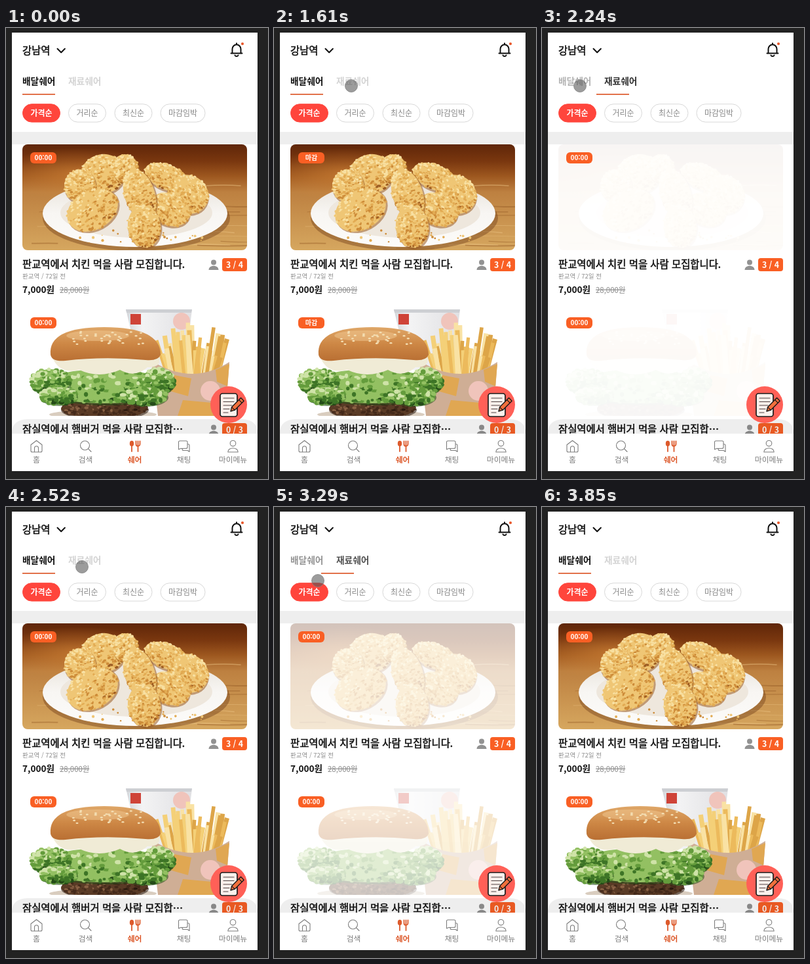
An HTML page for the animation above (4340 ms loop, 400 px wide and 686 px high).

```html
<!DOCTYPE html>
<html lang="ko">
<head>
<meta charset="utf-8">
<title>쉐어 목록</title>
<style>
  html, body { margin: 0; width: 100%; height: 100%; overflow: hidden; background: #222; }
  svg { display: block; width: 400px; height: 686px; }
  text { font-family: "Noto Sans CJK KR", "Noto Sans CJK", "Noto Sans", sans-serif; white-space: pre; }
  .mid { text-anchor: middle; }
  .title { font-size: 15.4px; fill: #111; stroke: #111; stroke-width: .55px; }
  .tab { font-size: 13.7px; font-weight: 700; }
  .small { font-size: 9.5px; fill: #8c8c8c; }
  .chip { font-size: 12px; fill: #8a8a8a; }
  .badge { font-size: 10px; font-weight: 700; fill: #fff; }
  .count { font-size: 12.3px; font-weight: 700; fill: #fff; }
  .nav { font-size: 11.8px; fill: #7d7d7d; }
  .icon { fill: none; stroke: #7d7d7d; stroke-width: 1.1; stroke-linejoin: round; stroke-linecap: round; }
  .ink { fill: none; stroke: #111; stroke-width: 2; stroke-linecap: round; stroke-linejoin: round; }
</style>
</head>
<body>
<svg viewBox="0 0 400 686">
  <defs>
    <linearGradient id="wood" x2="0" y2="1">
      <stop offset="0" stop-color="#5f2609"/><stop offset=".16" stop-color="#7a370f"/>
      <stop offset=".3" stop-color="#9d571f"/><stop offset=".45" stop-color="#bd8040"/>
      <stop offset="1" stop-color="#d6a75f"/>
    </linearGradient>
    <radialGradient id="glow">
      <stop offset="0" stop-color="#d88a3a" stop-opacity=".6"/><stop offset="1" stop-color="#d88a3a" stop-opacity="0"/>
    </radialGradient>
    <linearGradient id="bun" x2="0" y2="1">
      <stop offset="0" stop-color="#dfa768"/><stop offset=".5" stop-color="#cd8745"/>
      <stop offset="1" stop-color="#b96f33"/>
    </linearGradient>
    <linearGradient id="plate" x2="0" y2="1">
      <stop offset="0" stop-color="#e6e0d8"/><stop offset=".5" stop-color="#f8f6f3"/>
      <stop offset="1" stop-color="#fcfbf9"/>
    </linearGradient>
    <linearGradient id="cup">
      <stop offset="0" stop-color="#d4d6da"/><stop offset=".25" stop-color="#f3f3f4"/>
      <stop offset="1" stop-color="#e0e0e3"/>
    </linearGradient>
    <clipPath id="chickenFrame"><rect x="25" y="177" width="343" height="161" rx="8"/></clipPath>
    <clipPath id="burgerFrame"><rect x="25" y="428" width="343" height="162" rx="8"/></clipPath>
  </defs>

  <rect width="400" height="686" fill="#222"/>
  <rect x="9" y="7" width="375" height="667" fill="#fff"/>

  <text class="title" x="25" y="39.5">강남역</text>
  <path class="ink" d="M78.5 31.5l5.7 5.7 5.7-5.7"/>
  <path class="ink" d="M343.5 38.5h17M345.5 38V32a6.5 6.8 0 0 1 13 0v6M352 25v-1.8M349.5 41.5a2.6 2.2 0 0 0 5 0"/>
  <circle cx="361" cy="24" r="2.1" fill="#e8572a"/>

  <text class="tab" id="deliveryTab" x="25" y="85.5">배달쉐어</text>
  <text class="tab" id="produceTab" x="95" y="85.5">재료쉐어</text>
  <rect id="underline" y="100" width="50" height="1.7" fill="#dd5a2c"/>
  <g id="chips"></g>
  <rect x="9" y="158" width="375" height="19" fill="#eee"/>

  <g class="photo" clip-path="url(#chickenFrame)">
    <rect x="25" y="177" width="343" height="161" fill="url(#wood)"/>
    <ellipse cx="110" cy="222" rx="120" ry="40" fill="url(#glow)"/>
    <g id="grain"></g>
    <ellipse cx="199" cy="289" rx="143" ry="50" fill="#74421b" opacity=".45"/>
    <ellipse cx="197" cy="282" rx="141" ry="51" fill="url(#plate)"/>
    <ellipse cx="199" cy="281" rx="116" ry="38" fill="#eee7dd"/>
    <g id="chicken"></g>
  </g>
  <g class="photo" clip-path="url(#burgerFrame)">
    <path d="M183 428H284L273 520H205Z" fill="url(#cup)"/>
    <path d="M183 428H284L283 433H184Z" fill="#cdcfd3"/>
    <rect x="190" y="435" width="16" height="16" fill="#cf4338"/>
    <circle cx="268" cy="446" r="13" fill="#f0c4bb"/>
    <g id="fries"></g>
    <path d="M222 506Q283 545 341 508L335 590H232Z" fill="#cfae95"/>
    <path d="M252 527L283 533 278 560 250 552ZM320 520L341 511 338 545 322 538ZM270 566L336 572 335 590H262Z" fill="#e0a752"/>
    <circle cx="312" cy="552" r="15" fill="#f0c4bb"/>
    <ellipse cx="148" cy="588" rx="82" ry="7" fill="#d9cdbf"/>
    <g id="patty"></g>
    <g id="lettuce"></g>
    <path d="M70 500Q150 482 234 500Q238 517 216 516Q197 533 174 520Q142 534 112 520Q82 528 70 500Z" fill="#f0ebd6"/>
    <path d="M68 497Q64 455 150 455Q236 455 236 497Q232 507 213 505Q150 499 91 506Q70 508 68 497Z" fill="url(#bun)"/>
    <ellipse cx="140" cy="468" rx="48" ry="8" fill="#f3cf9a" opacity=".45"/>
    <g id="sesame"></g>
  </g>

  <g id="cards"></g>

  <path d="M9 674V613Q11 596 32 595H361Q382 596 384 613V674Z" fill="#000" opacity=".065"/>
  <circle cx="340" cy="573" r="28" fill="#ff6057"/>
  <g stroke="#1b1b1b" stroke-linejoin="round" stroke-linecap="round">
    <rect x="327" y="556" width="26" height="35" rx="3.5" fill="#fdf1ec" stroke-width="1.7"/>
    <path d="M332 563h16M332 568.5h16M332 574h13M332 579.5h9M332 585h7" stroke="#4b4343" stroke-width="1.2"/>
    <path d="M343 583l1.6-6.4 14-14 4.6 4.6-14 14z" fill="#f2703c" stroke-width="1.4"/>
    <path d="M344.6 576.6l4.6 4.6M355.5 565.5l4.6 4.6" stroke-width="1.2"/>
  </g>

  <rect x="9" y="617" width="375" height="57" fill="#fff"/>
  <g class="icon">
    <path d="M38 634l8.5-6.5 8.5 6.5v9a2 2 0 0 1-2 2H40a2 2 0 0 1-2-2zM43.5 645v-6a3 3 0 0 1 6 0v6"/>
    <circle cx="120.5" cy="635" r="7"/><path d="M125.7 640.2l4.3 4.3"/>
    <path d="M267 639.5l-3.5 1.5V630a2 2 0 0 1 2-2H275a2 2 0 0 1 2 2v7.5a2 2 0 0 1-2 2zM277 633h1a2 2 0 0 1 2 2v9.5l-3-2H271a2 2 0 0 1-2-2V639.5"/>
    <circle cx="346.5" cy="631.8" r="4.3"/><path d="M338.8 645c0-8 15.4-8 15.4 0z"/>
  </g>
  <ellipse cx="192" cy="632" rx="3.2" ry="4.3" fill="#dd5a2c"/>
  <path d="M192 635v9M201.5 635v9M198.5 628.5v4.5a3 3 0 0 0 6 0v-4.5M201.5 628.5v6" fill="none" stroke="#dd5a2c" stroke-width="1.8" stroke-linecap="round"/>
  <g id="navLabels"></g>

  <circle id="ring" cx="220" cy="82" r="21" fill="none" stroke="#9a9a9a"/>
  <path id="arrow" d="M0 0V13.5L3.2 10.6 5.3 15.6 7.6 14.6 5.5 9.8H9.8Z" fill="#000" stroke="#fff"/>
  <circle id="touch" r="9.5" fill="#555" fill-opacity=".58" stroke="#808080" stroke-opacity=".75"/>
</svg>
<script>
const $ = id => document.getElementById(id);
const clamp = v => Math.min(1, Math.max(0, v));

function add(parent, tag, attrs, label) {
  const node = document.createElementNS('http://www.w3.org/2000/svg', tag);
  for (const key in attrs) node.setAttribute(key, attrs[key]);
  if (label) node.textContent = label;
  parent.appendChild(node);
  return node;
}

let seed = 7;
const random = () => (seed = seed * 16807 % 2147483647) / 2147483647;
const between = (a, b) => a + (b - a) * random();

// A bumpy mass: a shadowed ellipse covered with crumbs, lit from the upper left.
function mass(parent, [cx, cy, rx, ry, tilt = 0], colors, count, size) {
  const g = add(parent, 'g', { transform: `rotate(${tilt} ${cx} ${cy})` });
  const dark = colors[colors.length - 1];
  add(g, 'ellipse', { cx: cx + 1, cy: cy + 2, rx: rx + 1, ry: ry + 1, fill: dark, opacity: .55 });
  add(g, 'ellipse', { cx, cy, rx, ry, fill: colors[1] });
  for (let i = 0; i < count; i++) {
    const angle = random() * Math.PI * 2, reach = Math.sqrt(random());
    const dx = Math.cos(angle) * reach, dy = Math.sin(angle) * reach;
    const shade = clamp(.4 + dy * .3 + dx * .12 + between(-.4, .35));
    add(g, 'ellipse', {
      cx: cx + dx * rx, cy: cy + dy * ry,
      rx: between(.5, 1) * size, ry: between(.35, .75) * size,
      fill: colors[Math.round(shade * (colors.length - 1))]
    });
  }
}

function drawPhotos() {
  for (let i = 0; i < 34; i++) {
    const y = between(240, 338), x = between(0, 330);
    add($('grain'), 'path', {
      d: `M${x} ${y}q30 ${between(-4, 3)} ${between(40, 110)} 0`,
      fill: 'none', stroke: i % 2 ? '#9a6029' : '#ebc384', 'stroke-width': between(.6, 2), opacity: .5
    });
  }
  const crust = ['#f8e0a2', '#efc675', '#e2ab53', '#cd8b38', '#9c5c22'];
  const pieces = [
    [246, 227, 36, 19, 22], [278, 253, 32, 29, 30], [250, 276, 32, 24, 25],
    [148, 222, 34, 30, -10], [113, 240, 24, 25], [132, 277, 41, 30, -28],
    [182, 214, 20, 22, -15], [204, 253, 23, 40, -18], [211, 302, 25, 32, -8]
  ];
  for (const piece of pieces) mass($('chicken'), piece, crust, 260, 2.8);
  for (let i = 0; i < 26; i++)
    add($('chicken'), 'circle', { cx: between(100, 300), cy: between(308, 327), r: between(.8, 2.2), fill: crust[1 + i % 3] });

  const potato = ['#f4d078', '#ecba5c', '#f9e2a4', '#dda548'];
  for (let i = 0; i < 44; i++) {
    const u = random();
    add($('fries'), 'path', {
      d: `M${252 + 70 * u} 545L${238 + 98 * u + between(-8, 8)} ${between(447, 500) + 12 * u}`,
      stroke: potato[i % 4], 'stroke-width': between(5, 7.5), 'stroke-linecap': 'square'
    });
  }
  mass($('patty'), [150, 579, 66, 15], ['#8a6245', '#5a3b26', '#43291a', '#2a190f'], 240, 3.2);
  const leaves = ['#cfe3a8', '#93c062', '#649c3c', '#3d7426', '#244b18'];
  for (const leaf of [[150, 545, 100, 26], [68, 538, 30, 19], [80, 560, 28, 12], [232, 537, 25, 19], [212, 560, 34, 13]])
    mass($('lettuce'), leaf, leaves, 200, 5);
  for (let i = 0; i < 34; i++)
    add($('sesame'), 'ellipse', { cx: between(92, 212), cy: between(460, 482), rx: 2, ry: 1.2, fill: '#f4dfb4' });
}

const badges = [];
function drawCard(top, title, count) {
  const g = add($('cards'), 'g', { transform: `translate(0 ${top})` });
  const orange = '#f95f24';
  add(g, 'rect', { x: 37, y: 12, width: 40, height: 17, rx: 6, fill: orange });
  badges.push(add(g, 'text', { class: 'badge mid', x: 57, y: 24.3 }, '00:00'));
  add(g, 'text', { class: 'title', x: 25, y: 187.5 }, title);
  add(g, 'circle', { cx: 317, cy: 179.5, r: 4, fill: '#929292' });
  add(g, 'path', { d: 'M309.5 191c0-8.5 15-8.5 15 0z', fill: '#929292' });
  add(g, 'rect', { x: 330, y: 173, width: 38, height: 20, rx: 4, fill: orange });
  add(g, 'text', { class: 'count mid', x: 349, y: 187.5 }, count);
  add(g, 'text', { class: 'small', x: 25, y: 204.3 }, '판교역 / 72일 전');
  add(g, 'text', { x: 25, y: 226, 'font-size': 13.6, 'font-weight': 700, fill: '#111' }, '7,000원');
  add(g, 'text', { x: 82, y: 225.5, 'font-size': 11.4, fill: '#8c8c8c', 'text-decoration': 'line-through' }, '28,000원');
}

function drawInterface() {
  [['가격순', 25, 58], ['거리순', 95, 58], ['최신순', 165.5, 58], ['마감임박', 235.5, 69]].forEach(([label, x, width], i) => {
    const look = i ? { fill: '#fff', stroke: '#d8d8d8' } : { fill: '#ff453c', stroke: '#ff453c' };
    add($('chips'), 'rect', { x: x + .5, y: 115.7, width: width - 1, height: 27.4, rx: 13.7, ...look });
    const text = add($('chips'), 'text', { class: 'chip mid', x: x + width / 2, y: 134 }, label);
    if (!i) text.style.cssText = 'fill:#fff;font-weight:700';
  });
  drawCard(177, '판교역에서 치킨 먹을 사람 모집합니다.', '3 / 4');
  drawCard(428, '잠실역에서 햄버거 먹을 사람 모집합…', '0 / 3');
  ['홈', '검색', '쉐어', '채팅', '마이메뉴'].forEach((label, i) => {
    const text = add($('navLabels'), 'text', { class: 'nav mid', x: 46.5 + 75 * i, y: 661 }, label);
    if (i === 2) text.style.cssText = 'fill:#dd5a2c;font-weight:700';
  });
}

const LOOP = 4340, STEP = 70, SLIDE = 280;
const EXPIRED_AT = 350;
const switches = [1635, 2192, 2690, 3198]; // alternately to the second tab and back
const arrowPath = [[70, 205, 680], [280, 212, 420], [490, 219, 96], [560, 220, 82], [1050, 220, 82]];
const touchPath = [
  [1050, 198, 81], [1120, 160, 82], [1190, 128, 86], [1260, 118, 88], [1750, 118, 88], [1960, 62, 87],
  [2030, 58, 88], [2310, 58, 88], [2520, 116, 91], [2590, 118, 90], [2800, 118, 90], [3080, 58, 92],
  [3220, 59, 95], [3290, 67, 112], [3500, 150, 420], [3710, 209, 674], [3780, 210, 675], [3850, 210, 675]
];

function follow(node, path, t) {
  const next = path.findIndex(key => key[0] > t);
  node.style.display = next > 0 ? '' : 'none';
  if (next < 1) return;
  const [t0, x0, y0] = path[next - 1], [t1, x1, y1] = path[next];
  const k = (t - t0) / (t1 - t0);
  node.setAttribute('transform', `translate(${x0 + (x1 - x0) * k} ${y0 + (y1 - y0) * k})`);
}

const gray = k => { const v = Math.round(17 + 195 * k); return `rgb(${v},${v},${v})`; };

function render(t) {
  const past = switches.filter(start => start <= t);
  const elapsed = past.length ? t - past[past.length - 1] : LOOP;
  const moved = clamp(elapsed / SLIDE);
  const tab = past.length % 2 ? moved : 1 - moved;
  $('underline').setAttribute('x', 25 + 70 * tab);
  $('deliveryTab').style.fill = gray(tab);
  $('produceTab').style.fill = gray(1 - tab);

  const shown = clamp((elapsed - 40) / 190);
  document.querySelectorAll('.photo').forEach(photo => photo.style.opacity = shown);
  const label = t >= EXPIRED_AT && t < switches[0] ? '마감' : '00:00';
  badges.forEach(badge => badge.textContent = label);

  $('ring').style.display = t >= 630 && t < 840 ? '' : 'none';
  follow($('arrow'), arrowPath, t);
  follow($('touch'), touchPath, t);
}

drawPhotos();
drawInterface();
const begin = performance.now();
function tick() {
  const t = (performance.now() - begin) % LOOP;
  render(Math.floor(t / STEP) * STEP);
  requestAnimationFrame(tick);
}
tick();
</script>
</body>
</html>
```
